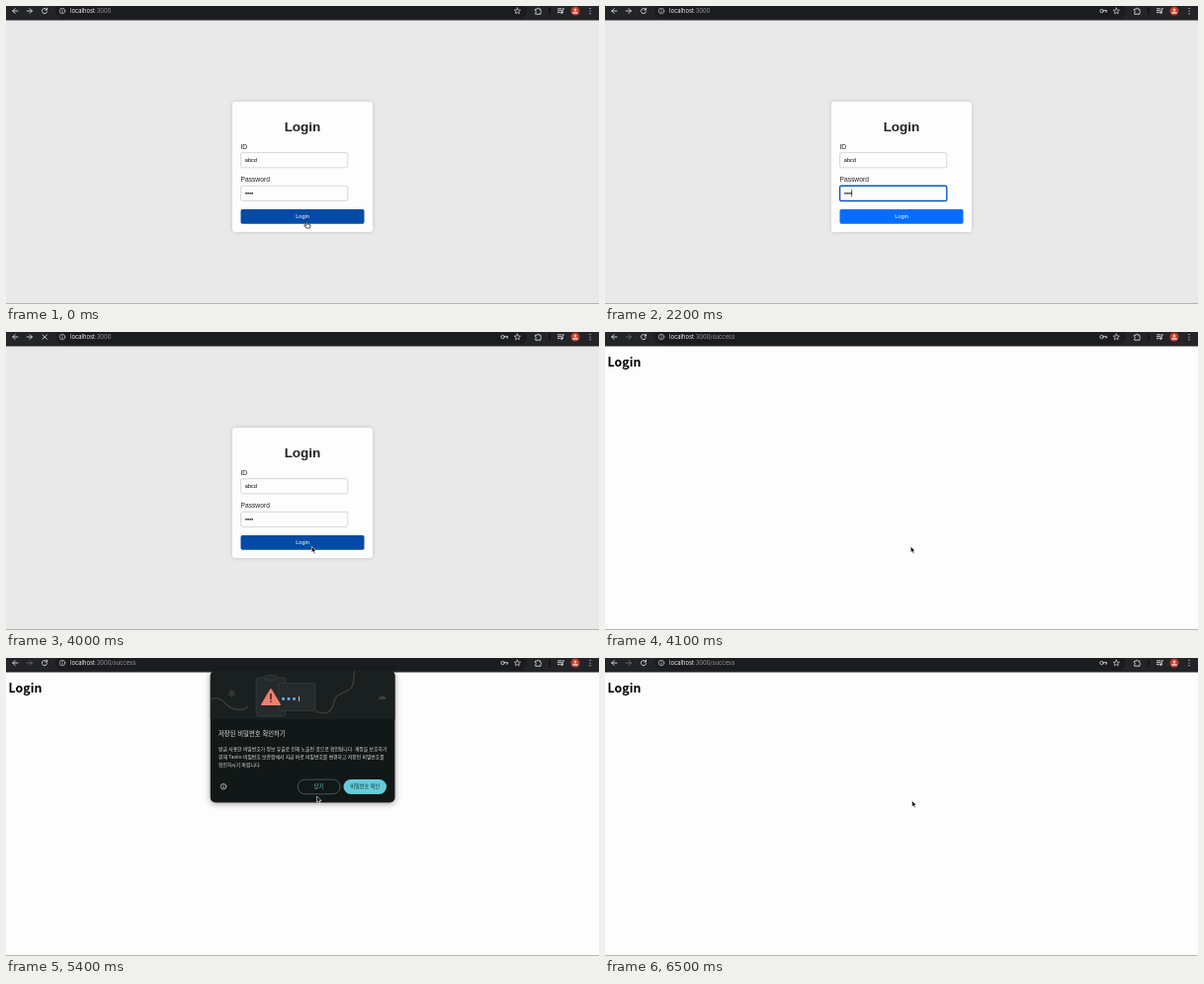
Animation of 600 by 302 pixels, one loop 7.9 s. Source, as an HTML page:

```html
<!DOCTYPE html>
<html lang="ko">
<head>
<meta charset="utf-8">
<title>Login</title>
<style>
  html, body { margin: 0; height: 100%; overflow: hidden; background: #fdfdfd; }
  svg { display: block; width: 100vw; height: 100vh; }
  .ui { font-family: Inter, Roboto, sans-serif; font-size: 5.85px; }
  .form { font-family: "Liberation Sans", Arial, sans-serif; font-size: 6.7px; fill: #222; }
  .small { font-size: 5.6px; }
  .ko { font-family: "Noto Sans CJK KR", "Noto Sans CJK", sans-serif; font-size: 4.83px; fill: #e1e4e3; }
  .mid { text-anchor: middle; }
  .line { fill: none; stroke: #dcdde0; stroke-linecap: round; stroke-linejoin: round; }
  .card { filter: drop-shadow(0 0 2px rgba(0,0,0,.15)); }
  .sheet { filter: drop-shadow(0 1px 3px rgba(0,0,0,.4)); }
</style>
</head>
<body>
<svg viewBox="0 0 600 302" preserveAspectRatio="none">
  <g id="form" class="form">
    <rect width="600" height="302" fill="#e9e9e9"/>
    <rect class="card" x="229" y="97" width="142" height="132" rx="3" fill="#fdfdfd"/>
    <text class="mid" x="300" y="127" font-size="13.5" font-weight="bold">Login</text>
    <text x="237.5" y="144.7">ID</text>
    <text x="237.5" y="178.4">Password</text>
    <g fill="#fdfdfd" stroke="#c9c9c9" stroke-width=".7">
      <rect x="237.6" y="148.6" width="108.2" height="15.2" rx="1.6"/>
      <rect id="field" x="237.6" y="182.3" width="108.2" height="15.2" rx="1.6"/>
    </g>
    <text class="small" x="241.8" y="158" fill="#000">abcd</text>
    <path d="M243 189.8h6.2" stroke="#111" stroke-width="1.7" stroke-linecap="round" stroke-dasharray="0 2.05"/>
    <path id="caret" d="M249.7 186.2v6.8" stroke="#000" stroke-width=".7"/>
    <rect id="button" x="237.5" y="206" width="125" height="14.7" rx="1.7"/>
    <text class="small mid" x="300" y="215.2" fill="#fff">Login</text>
  </g>

  <g id="done">
    <rect width="600" height="302" fill="#fdfdfd"/>
    <text class="ko" x="2.6" y="35.4" style="font-size:12.4px;font-weight:bold;fill:#000">Login</text>
  </g>

  <rect y="301" width="600" height="1" fill="#b4b4b4"/>

  <g class="ui">
    <rect width="600" height="14.5" fill="#232427"/>
    <rect x="50" y="-3" width="477" height="15.5" rx="7.7" fill="#1b1c1f"/>
    <g class="line" stroke-width=".9">
      <path d="M12 5H6.8M9.2 2.6L6.8 5l2.4 2.4"/>
      <path id="next" d="M21.2 5h5.2M24 2.6L26.4 5L24 7.4"/>
      <path id="reload" d="M41.3 3.6A2.6 2.6 0 1 0 41.6 5.7M41.6 2.2v1.8h-1.8"/>
      <path id="stop" d="M37 2.8l4.4 4.4M41.4 2.8L37 7.2"/>
      <path d="M57 4.9v1.5M57 3.4v.1" stroke-width=".7"/>
      <circle cx="57" cy="5" r="2.8" stroke-width=".6"/>
      <g id="key" stroke-width=".8"><circle cx="502.6" cy="5" r="1.7"/><path d="M504.4 4.4h3.2v1.6h-1.2"/></g>
      <path d="M517.4 2l.9 2 2.2.2-1.7 1.4.5 2.1-1.9-1.1-1.9 1.1.5-2.1-1.7-1.4 2.2-.2z" stroke-width=".7"/>
      <path d="M535.8 3.2h1.6a1 1 0 0 1 2 0h1.5v1.7a1 1 0 0 1 0 1.8v1.5h-5.1V6.6a1 1 0 0 0 0-1.8z"/>
      <path d="M550 2v6" stroke="#060607" stroke-width="1"/>
      <path d="M558.4 2.8h3.4M558.4 4.7h3.4M558.4 6.6h1.8M563.2 6.5V2.8h1.4"/>
      <circle cx="562.3" cy="6.7" r=".8"/>
      <path d="M591 2.4v.1M591 5v.1M591 7.6v.1" stroke-width="1.2"/>
    </g>
    <circle cx="576" cy="5" r="4.5" fill="#c6392b"/>
    <path d="M573.2 7.8a2.8 2.2 0 0 1 5.6 0z" fill="#f6c4b8"/>
    <circle cx="576" cy="3.8" r="1.4" fill="#f6c4b8"/>
    <text x="65" y="7.1" fill="#f0f0f2">localhost<tspan fill="#96989c">:3000<tspan id="path"></tspan></tspan></text>
  </g>

  <g id="dialog">
    <rect class="sheet" x="206.8" y="13" width="186.7" height="133.4" rx="5" fill="#121817"/>
    <path d="M206.8 62V18a5 5 0 0 1 5-5h176.700a5 5 0 0 1 5 5v44z" fill="#1a201f"/>
    <g fill="none" stroke="#3b403f" stroke-width="1.3">
      <path d="M207 42c8-3 11 0 16 5s15 8 22 2"/>
      <path d="M313 54c12 5 17 0 19-10s14-8 18-15 0-10 3-16"/>
      <path d="M228.500 32v8M225 34l7 4M225 38l7-4"/>
    </g>
    <path d="M377 42a3.600 3.600 0 0 1 7.200 0z" fill="#3b403f"/>
    <g fill="#252a2a" stroke="#3a3f3f" stroke-width=".7">
      <rect x="253" y="20" width="30" height="39" rx="3"/>
      <rect x="262" y="17.500" width="12" height="5" rx="2"/>
      <rect x="276" y="25.500" width="37" height="28" rx="1.500"/>
    </g>
    <path d="M268 32l9 15.200h-18z" fill="#ee7f70" stroke="#ee7f70" stroke-width="1.800" stroke-linejoin="round"/>
    <path d="M268 36.500v5M268 44v.2" stroke="#2a2020" stroke-width="1.500" stroke-linecap="round"/>
    <path d="M280.500 41.300h12" stroke="#71a8f0" stroke-width="3.200" stroke-linecap="round" stroke-dasharray="0 5.500"/>
    <path d="M296.500 38.800v5" stroke="#cfd8e2" stroke-width=".9"/>
    <g class="ko">
      <text x="215" y="78.500" style="font-size:6.35px;font-weight:500">저장된 비밀번호 확인하기</text>
      <text x="215" y="93.900">방금 사용한 비밀번호가 정보 유출로 인해 노출된 것으로 확인됩니다. 계정을 보호하기</text>
      <text x="215" y="102.100">위해 Tavilo 비밀번호 보관함에서 지금 바로 비밀번호를 변경하고 저장된 비밀번호를</text>
      <text x="215" y="110.200">확인하시기 바랍니다.</text>
      <g class="mid" style="font-size:5.2px;font-weight:500">
        <rect x="295.200" y="123.200" width="42.800" height="14.600" rx="7.300" fill="none" stroke="#5b7277" stroke-width=".7"/>
        <text x="316.500" y="132.400" fill="#78d3e1">닫기</text>
        <rect x="341.500" y="123" width="43.500" height="15" rx="7.500" fill="#68cbd8"/>
        <text x="363.200" y="132.400" fill="#08363d">비밀번호 확인</text>
      </g>
    </g>
    <g class="line" stroke-width=".7"><circle cx="220" cy="130.300" r="2.800"/><path d="M220 130.200v1.500M220 128.800v.1"/></g>
  </g>

  <g id="cursor">
    <path id="arrow" d="M0 0v6.200l1.500-1.300 1 2.200 1.100-.5-1-2.100h1.900z" fill="#000" stroke="#fff" stroke-width=".6"/>
    <path id="hand" d="M-.6 .6q.6-.9 1.200 0v2.300l2.300.7q.7.300.6 1.100l-.5 2.300H-.8L-2.700 4.400q-.2-.9.700-.7l1.400.9z" fill="#fff" stroke="#000" stroke-width=".7"/>
    <path id="beam" d="M-1.300-3.200q1.300 0 1.300.8q0-.8 1.300-.8M0-2.400v4.900M-1.300 3.300q1.300 0 1.300-.8q0 .8 1.300.8M-.8 .8h1.600" fill="none" stroke="#111" stroke-width=".7"/>
  </g>
</svg>
<script>
const LOOP = 7900, STEP = 100;
const $ = id => document.getElementById(id);
const show = (id, on) => $(id).setAttribute('display', on ? 'inline' : 'none');
const within = (t, a, b) => t >= a && t < b;

// time, x, y of the pointer
const track = [
  [0, 304.5, 218], [800, 257, 199], [1100, 254, 193], [1300, 253, 192],
  [2200, 253, 192], [2600, 287, 241], [3000, 309, 218], [3500, 309.3, 217.3],
  [4600, 309.3, 217.3], [5200, 316, 146], [5400, 314.5, 140], [5700, 316, 131],
  [6000, 316, 133], [6500, 310.6, 144.6], [LOOP, 310.6, 144.6]
];

function pointer(t) {
  const i = track.findIndex(k => k[0] > t);
  const [t0, x0, y0] = track[i - 1], [t1, x1, y1] = track[i];
  const u = (t - t0) / (t1 - t0), e = u * u * (3 - 2 * u);
  return [x0 + (x1 - x0) * e, y0 + (y1 - y0) * e];
}

function draw(t) {
  const [x, y] = pointer(t);
  const done = t >= 4100, live = t < 3900;
  const focus = within(t, 1500, 3900), loading = within(t, 3900, 4100);
  const inX = (a, b) => x >= a && x <= b;
  const hover = inX(237, 363) && y >= 206 && y <= 221;
  const typing = inX(237, 346) && y >= 182 && y <= 198;

  show('form', !done);
  show('done', done);
  show('key', t >= 1500);
  show('stop', loading);
  show('reload', !loading);
  $('next').setAttribute('opacity', done ? .35 : 1);
  $('path').textContent = done ? '/success' : '';

  $('field').setAttribute('stroke', focus ? '#0b56c4' : '#c9c9c9');
  $('field').setAttribute('stroke-width', focus ? 1.4 : .7);
  show('caret', [1500, 2200, 3200].some(s => within(t, s, s + 500)));
  $('button').setAttribute('fill', hover ? '#034ba6' : '#056dff');

  const alpha = within(t, 4500, 6000) ? (t < 4600 ? .83 : t < 5900 ? 1 : .5) : 0;
  $('dialog').setAttribute('opacity', alpha);
  $('dialog').setAttribute('transform', `translate(0 ${t < 4600 ? -2 : 0})`);

  const kind = live && hover ? 'hand' : live && typing ? 'beam' : 'arrow';
  for (const k of ['arrow', 'hand', 'beam']) show(k, k === kind);
  show('cursor', !within(t, 1900, 2300));
  $('cursor').setAttribute('transform', `translate(${x} ${y})`);
}

const start = performance.now();
function tick() {
  const t = (performance.now() - start) % LOOP;
  draw(Math.floor(t / STEP) * STEP);
  requestAnimationFrame(tick);
}
tick();
</script>
</body>
</html>
```
